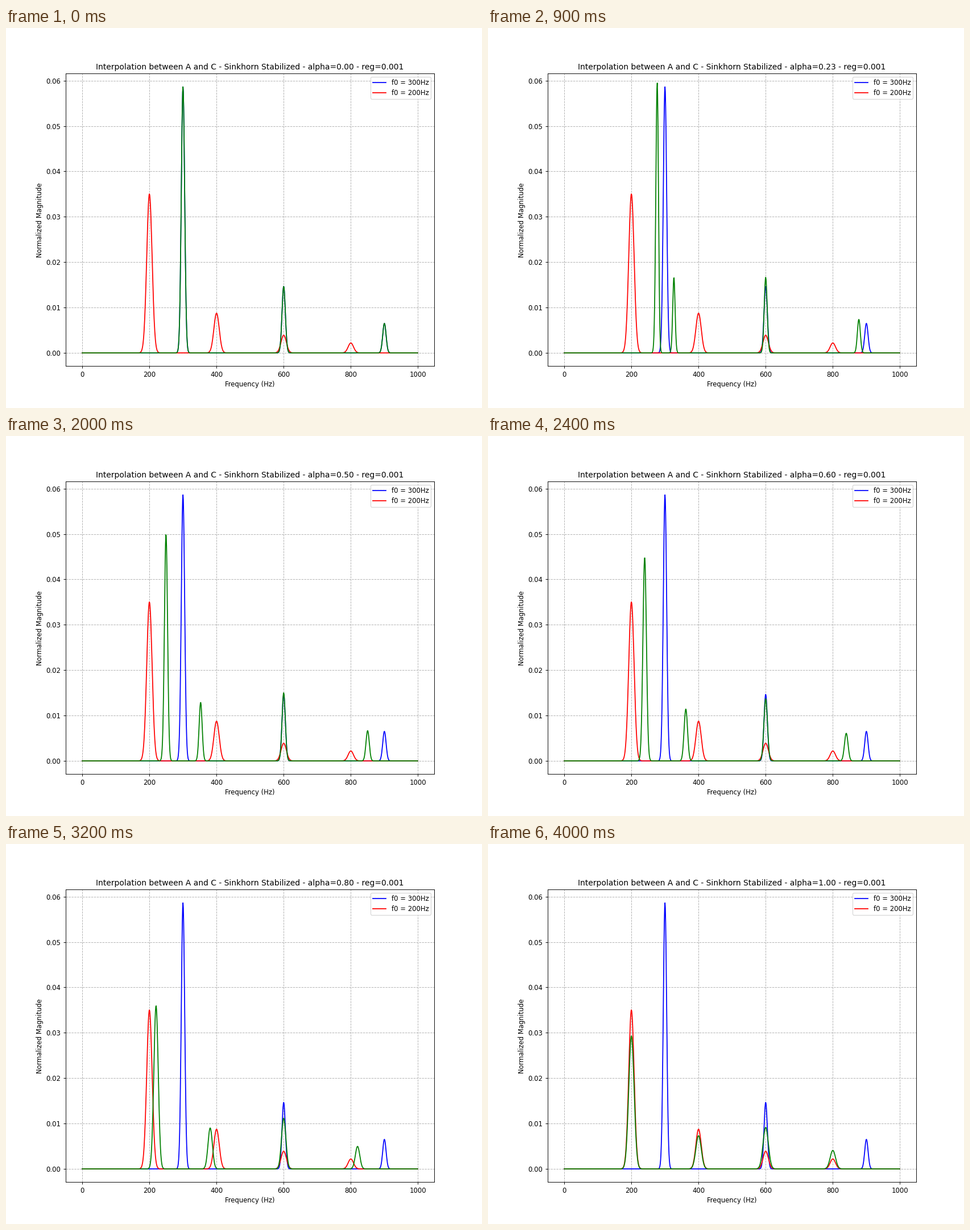
Recreate the animation shown at these times as a matplotlib script. Size 837 by 669 pixels, loop 4100 ms.

```python
import numpy as np
import matplotlib.pyplot as plt
from matplotlib.animation import FuncAnimation

FRAMES = 41
INTERVAL = 100
REG = 0.001
DPI = 83.7
SIZE = 1000
FINE = 4  # sub-samples per Hz
FREQ = np.arange(SIZE)
GRID = np.arange(SIZE * FINE) / FINE
ALPHAS = np.linspace(0, 1, FRAMES)


def spectrum(f0, sigma, harmonics):
    """Harmonic peaks falling off as 1/h^2, normalised to unit area."""
    mag = sum(np.exp(-0.5 * ((GRID - f0 * h) / sigma) ** 2) / h ** 2
              for h in range(1, harmonics + 1))
    return mag / mag.sum() * FINE


def around(centers, reach):
    return np.concatenate([np.arange((c - reach) * FINE, (c + reach) * FINE + 1)
                           for c in centers])


def transport(source, target, src_center, dst_centers, steps=400):
    """Entropic plan that carries one source peak to its target peaks."""
    i, j = around([src_center], 30), around(dst_centers, 48)
    a, b = source[i], target[j]
    b = b * a.sum() / b.sum()
    x, y = GRID[i], GRID[j]
    kernel = np.exp(-((x[:, None] - y) / SIZE) ** 2 / REG)
    v = np.ones_like(b)
    for _ in range(steps):
        u = a / (kernel @ v)
        v = b / (kernel.T @ u)
    u = a / (kernel @ v)
    return x[:, None], y[None, :], u[:, None] * kernel * v


blue = spectrum(300, 5, 3)
red = spectrum(200, 8, 4)
plans = [transport(blue, red, c, targets)
         for c, targets in ((300, (200, 400)), (600, (600,)), (900, (800,)))]


def interpolate(alpha):
    """Move the mass of every plan a fraction alpha along its path."""
    out = np.zeros(len(GRID) + 1)
    for x, y, mass in plans:
        pos = FINE * ((1 - alpha) * x + alpha * y).ravel()
        m = mass.ravel()
        cell = np.floor(pos + 1e-9).astype(int)
        frac = np.clip(pos - cell, 0, 1)
        out += np.bincount(cell, m * (1 - frac), minlength=len(out))
        out += np.bincount(cell + 1, m * frac, minlength=len(out))
    return out[:-1:FINE]


fig, ax = plt.subplots(figsize=(837.01 / DPI, 669.01 / DPI), dpi=DPI)
ax.plot(FREQ, blue[::FINE], "b", label="f0 = 300Hz")
ax.plot(FREQ, red[::FINE], "r", label="f0 = 200Hz")
line, = ax.plot(FREQ, blue[::FINE], "g")
x_margin, y_margin = 0.05 * FREQ[-1], 0.05 * blue.max()
ax.set_xlim(-x_margin, FREQ[-1] + x_margin)
ax.set_ylim(-y_margin, blue.max() + y_margin)
ax.set_xlabel("Frequency (Hz)")
ax.set_ylabel("Normalized Magnitude")
ax.grid(True, linestyle="--")
ax.legend(loc="upper right", labelspacing=0.39, borderpad=0.35)
title = ax.set_title("", fontsize=11.93)


def update(k):
    alpha = ALPHAS[k]
    line.set_ydata(interpolate(alpha))
    title.set_text("Interpolation between A and C - Sinkhorn Stabilized"
                   f" - alpha={alpha:.2f} - reg={REG}")
    return line, title


anim = FuncAnimation(fig, update, frames=FRAMES, interval=INTERVAL,
                     repeat=True, repeat_delay=0, blit=False)
plt.show()
```
